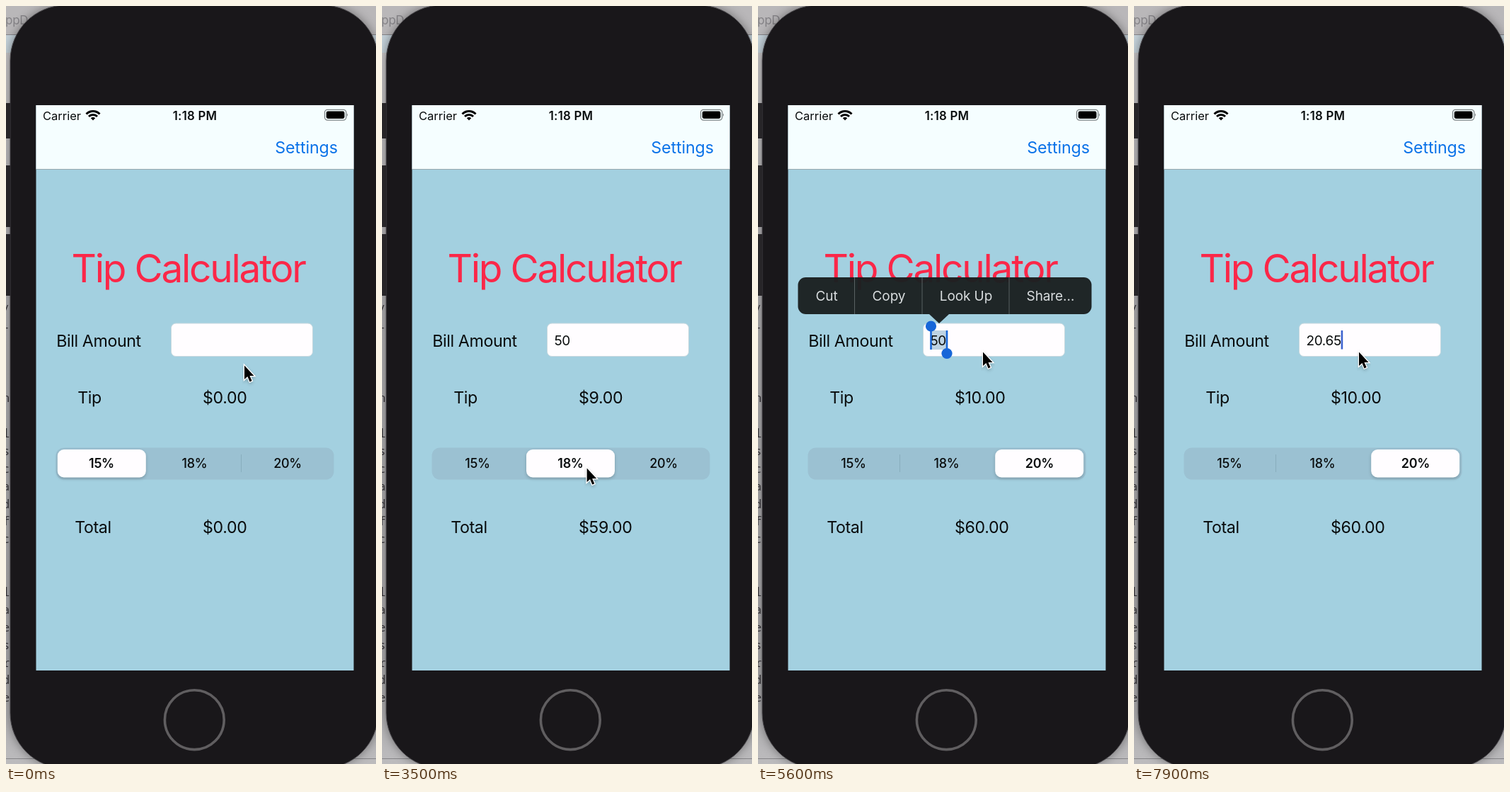
An HTML page for the animation above (8 s loop, 523 by 1070 pixels).

```html
<!DOCTYPE html>
<html lang="en">
<head>
<meta charset="utf-8">
<title>Tip Calculator</title>
<style>
  html, body { margin: 0; width: 100%; height: 100%; overflow: hidden; background: #19171a; }
  svg { display: block; width: 100%; height: 100%; }
  text { font-family: Inter, "Liberation Sans", sans-serif; font-size: 23.2px; letter-spacing: -.016em; fill: #090c0d; white-space: pre; }
  .mid { text-anchor: middle; }
  .title { font-size: 55px; letter-spacing: -.041em; fill: #fb2748; font-optical-sizing: none; }
  .link { letter-spacing: -.004em; fill: #0a72e8; }
  .status { font-size: 16.5px; letter-spacing: 0; }
  .clock { font-size: 16.8px; font-weight: 600; letter-spacing: .015em; }
  .segment { font-size: 18px; font-weight: 500; }
  .field { font-size: 19px; }
  .menu { font-size: 19px; letter-spacing: -.005em; fill: #d9dddf; }
  .code { font: 17px "Noto Sans Mono", monospace; fill: #39373b; letter-spacing: 0; }
  filter { color-interpolation-filters: sRGB; }
</style>
</head>
<body>
<svg viewBox="0 0 523 1070" preserveAspectRatio="none">
  <defs>
    <linearGradient id="desk" x2="0" y2="1">
      <stop offset="0" stop-color="#cbc9cb"/>
      <stop offset=".35" stop-color="#b0afb1"/>
      <stop offset=".9" stop-color="#abaaac"/>
      <stop offset="1" stop-color="#bcbbbd"/>
    </linearGradient>
    <filter id="soft" x="-20%" y="-20%" width="140%" height="150%">
      <feDropShadow dx="0" dy="2" stdDeviation="2" flood-opacity=".2"/>
    </filter>
    <filter id="glow" x="-10%" y="-10%" width="120%" height="120%">
      <feDropShadow dx="0" dy="0" stdDeviation="7" flood-opacity=".4"/>
    </filter>
  </defs>

  <rect width="523" height="1070" fill="url(#desk)"/>
  <rect width="523" height="40" fill="#b9b7b9"/>
  <rect y="40" width="523" height="26" fill="#c3d0d8"/>
  <path d="M0 40.5H523M0 1062.5H523" stroke="#858487"/>
  <text x="-1" y="26" style="font-size:17px;fill:#858387">ppDe</text>
  <g id="code"></g>

  <rect x="6" y="-1" width="520" height="1077" rx="78" fill="#19171a" stroke="#454347" filter="url(#glow)"/>
  <path d="M0 137H6V187H0ZM0 225H6V312H0ZM0 322H6V409H0Z" fill="#272528"/>
  <circle cx="266.3" cy="1007.7" r="41.9" fill="none" stroke="#605e60" stroke-width="3.6"/>

  <rect x="42.5" y="140" width="449" height="798" fill="#a3d0e0"/>
  <rect x="42.5" y="140" width="449" height="90" fill="#f5feff"/>
  <path d="M42.5 230.5H491.5" stroke="#98a8ad"/>

  <text class="status mid" x="79" y="160.5">Carrier</text>
  <g fill="none" stroke="#000" stroke-width="3">
    <path d="M113.5 152.5A13.4 13.4 0 0 1 132.5 152.5M117 156A8.5 8.5 0 0 1 129 156"/>
    <path d="M119.8 158.3A4.5 4.5 0 0 1 126.2 158.3L123 161.5Z" fill="#000" stroke="none"/>
  </g>
  <text class="clock mid" x="267" y="160.5">1:18 PM</text>
  <rect x="450.5" y="146.3" width="30.3" height="14.8" rx="4" fill="none" stroke="#7d8486" stroke-width="1.3"/>
  <rect x="452.7" y="148.5" width="25.8" height="10.4" rx="2.4"/>
  <path d="M482 151.5Q484 153.7 482 156Z" fill="#7d8486"/>
  <text class="link mid" x="424.5" y="207.5">Settings</text>

  <text class="title mid" x="257.6" y="390">Tip Calculator</text>
  <text class="mid" x="131" y="481">Bill Amount</text>
  <text class="mid" x="118" y="561">Tip</text>
  <text class="mid" x="123" y="744">Total</text>
  <text id="tip" x="278" y="561"></text>
  <text id="total" x="278" y="744"></text>

  <rect x="233.5" y="448" width="200" height="46.5" rx="6.5" fill="#fffdff" stroke="#c9d9df"/>
  <rect id="highlight" x="244" y="458" width="23" height="27" fill="#bdd3e3"/>
  <text id="bill" class="field" x="243.4" y="479"></text>
  <rect id="caret" y="458" width="2.6" height="26.5" fill="#3b62cf"/>

  <rect x="70.5" y="623.5" width="393" height="45" rx="11.5" fill="#9bc1d2"/>
  <g id="separators" stroke="#88adbd"><path d="M200.5 633V658"/><path d="M332.5 633V658"/></g>
  <rect id="pill" y="626" width="125" height="39.5" rx="9" fill="#fffdff" filter="url(#soft)"/>
  <g id="segments">
    <text class="segment mid" x="135" y="652.3">15%</text>
    <text class="segment mid" x="266.5" y="652.3">18%</text>
    <text class="segment mid" x="398" y="652.3">20%</text>
  </g>

  <g id="selection">
    <path d="M244.5 452V485M267 458V490" stroke="#1766d8" stroke-width="2.6"/>
    <g fill="#1766d8"><circle cx="244.5" cy="452" r="7.6"/><circle cx="267" cy="490.5" r="7.6"/></g>
    <g fill="#1b2022" fill-opacity=".97">
      <rect x="56.5" y="383" width="415" height="52" rx="11"/>
      <path d="M242 435H270L256 448Z"/>
    </g>
    <path d="M136.5 383V435M232 383V435M355 383V435" stroke="#596163"/>
    <text class="menu mid" x="97" y="416">Cut</text>
    <text class="menu mid" x="185" y="416">Copy</text>
    <text class="menu mid" x="294" y="416">Look Up</text>
    <text class="menu mid" x="413.5" y="416">Share…</text>
  </g>

  <g id="cursor">
    <path d="M1 1.5V21L5.4 17L8.6 24.4L11.6 23.1L8.5 15.9H14.5Z" stroke="#fff" stroke-width="2.6" paint-order="stroke" filter="url(#soft)"/>
  </g>
</svg>
<script>
const LOOP = 8000, STEP = 100;
const el = id => document.getElementById(id);
const clamp = v => Math.min(1, Math.max(0, v));
const ramp = (t, start, duration) => clamp((t - start) / duration);
const ease = (t, start, duration) => {
  const p = ramp(t, start, duration);
  return p * p * (3 - 2 * p);
};

// Editor text peeking out beside the phone: [baseline, letter]
const codeLines = [[434, "/"], [459, "-"], [559, "n"], [609, "l"], [634, "s"], [659, "c"], [684, "a"],
  [709, "d"], [733, "f"], [758, "c"], [833, "l"], [858, "a"], [883, "e"], [908, "s"], [933, "r"], [957, "d"], [982, "e"]];
el("code").innerHTML = codeLines.map(([y, c]) => `<text class="code" x="-5" y="${y}">${c}</text>`).join("");

// [time, text] for each keystroke; the first one focuses the field
const edits = [[1400, ""], [1700, "5"], [1800, "50"], [6400, "2"], [6500, "20"], [7400, "20."], [7700, "20.6"], [7900, "20.65"]];
const amounts = [[0, "$0.00", "$0.00"], [2780, "$9.00", "$59.00"], [4056, "$10.00", "$60.00"]];
// [start, duration, x, y] for each pointer move
const moves = [[400, 800, 325, 479], [2050, 650, 220, 653], [3200, 800, 437, 647], [4500, 600, 317, 487]];
const latest = (list, t) => list.filter(item => item[0] <= t).pop();

function drawField(t) {
  const [edited, text] = latest(edits, t) || [Infinity, ""];
  const bill = el("bill");
  bill.textContent = text;

  const selected = t >= 5300 && t < 6400;
  const idle = t - edited;
  const blink = idle < 500 ? 1 : clamp(.5 + 2 * Math.sin((idle - 1100) / 1000 * 2 * Math.PI));
  const caret = el("caret");
  caret.setAttribute("x", 243 + (text ? bill.getComputedTextLength() : 0));
  caret.setAttribute("opacity", idle >= 0 && !selected ? blink : 0);

  el("highlight").setAttribute("opacity", selected ? 1 : 0);
  el("selection").setAttribute("opacity", ramp(t, 5250, 150) * (1 - ramp(t, 6250, 150)));
}

function drawSegments(t) {
  const position = ease(t, 2780, 250) + ease(t, 4056, 250);
  el("pill").setAttribute("x", 72.8 + 131.2 * position);
  [...el("separators").children].forEach((line, k) =>
    line.setAttribute("opacity", clamp(Math.abs(position - k - .5) - .5)));
  [...el("segments").children].forEach((label, k) =>
    label.style.fontWeight = position === k ? 600 : 500);

  const [, tip, total] = latest(amounts, t);
  el("tip").textContent = tip;
  el("total").textContent = total;
}

function drawCursor(t) {
  let x = 336, y = 506;
  for (const [start, duration, toX, toY] of moves) {
    const p = ease(t, start, duration);
    x += (toX - x) * p;
    y += (toY - y) * p;
  }
  el("cursor").setAttribute("transform", `translate(${x} ${y})`);
}

function draw(now) {
  const t = Math.floor(now % LOOP / STEP) * STEP;
  drawField(t);
  drawSegments(t);
  drawCursor(t);
  requestAnimationFrame(draw);
}
draw(0);
</script>
</body>
</html>
```
